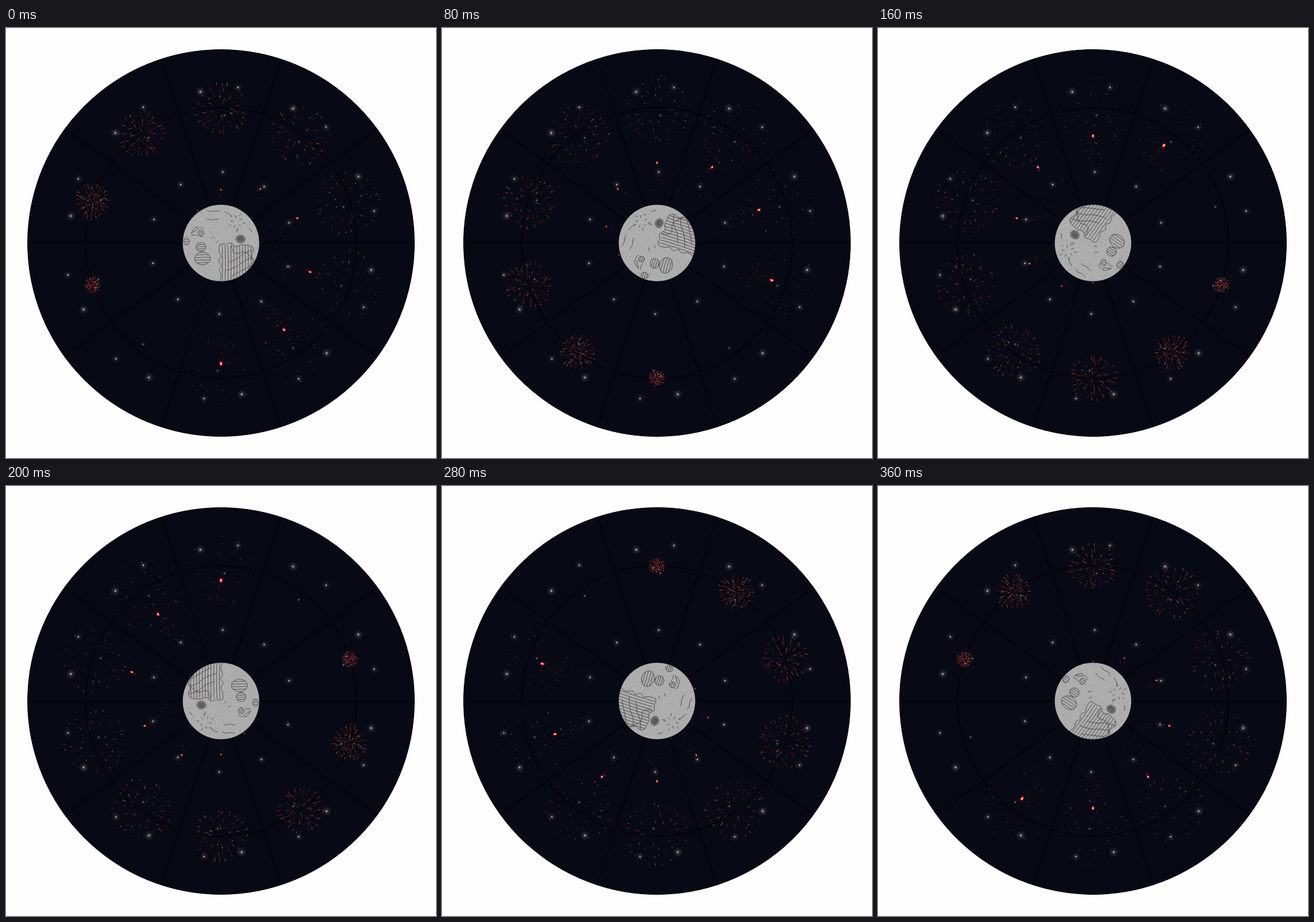
Recreate the animation shown at these times as an HTML page with a canvas. Size 748 by 748 pixels, loop 400 ms.

```html
<!DOCTYPE html>
<html lang="en">
<head>
<meta charset="utf-8">
<title>Fireworks wheel</title>
<style>
  html, body { margin: 0; width: 100%; height: 100%; overflow: hidden; background: #fefefe; }
  canvas { display: block; }
</style>
</head>
<body>
<canvas id="stage" width="748" height="748"></canvas>
<script>
const ctx = document.getElementById('stage').getContext('2d');
const TAU = Math.PI * 2;
const SECTOR = TAU / 10;
const STEP_MS = 40;
const CENTER = 374, DISC_R = 336.4, RING_R = 235.5, MOON_R = 66.5;

function seeded(seed) {
  return () => {
    seed = (seed + 0x6D2B79F5) | 0;
    let t = Math.imul(seed ^ (seed >>> 15), 1 | seed);
    t = (t + Math.imul(t ^ (t >>> 7), 61 | t)) ^ t;
    return ((t ^ (t >>> 14)) >>> 0) / 4294967296;
  };
}

function oval(x, y, rx, ry, tilt = 0) {
  ctx.beginPath();
  ctx.ellipse(x, y, rx, ry, tilt, 0, TAU);
}

function disc(x, y, r, color) {
  oval(x, y, r, r);
  ctx.fillStyle = color;
  ctx.fill();
}

function dot(x, y, size, color) {
  ctx.fillStyle = color;
  ctx.fillRect(x - size / 2, y - size / 2, size, size);
}

// Path smoothed through the midpoints of its points.
function trace(...p) {
  ctx.beginPath();
  ctx.moveTo(p[0], p[1]);
  for (let i = 2; i < p.length - 2; i += 2) {
    ctx.quadraticCurveTo(p[i], p[i + 1], (p[i] + p[i + 2]) / 2, (p[i + 1] + p[i + 3]) / 2);
  }
  ctx.lineTo(p[p.length - 2], p[p.length - 1]);
}

function curve(...points) {
  trace(...points);
  ctx.stroke();
}

function drawPlate() {
  disc(0, 0, DISC_R, '#070914');
  ctx.strokeStyle = '#000';
  ctx.lineWidth = 1;
  ctx.stroke();
  oval(0, 0, RING_R, RING_R);
  ctx.stroke();
  for (let i = 0; i < 10; i++) {
    ctx.beginPath();
    ctx.moveTo(0, 0);
    ctx.lineTo(DISC_R * Math.cos(i * SECTOR), DISC_R * Math.sin(i * SECTOR));
    ctx.stroke();
  }
}

function star(x, y, glow, alpha, core = 1) {
  const g = ctx.createRadialGradient(x, y, 0, x, y, glow);
  g.addColorStop(0, `rgba(190,190,190,${alpha})`);
  g.addColorStop(0.4, `rgba(130,130,130,${alpha * 0.4})`);
  g.addColorStop(1, 'rgba(90,90,90,0)');
  disc(x, y, glow, g);
  disc(x, y, core, '#e8e8e8');
}

function drawStars() {
  star(-36, -263, 9, 0.6);
  star(29.5, -270.5, 8, 0.42);
  star(6, -222, 4.5, 0.3, 0.7);
  star(3, -123.5, 8, 0.42);
}

const BURST_R = [14, 32, 42, 48, 54, 57, 59.5, 61, 61.5];
const STREAK = [5, 12, 11, 8.5, 6.5, 5, 4, 3, 2];
const SPARK_COLORS = ['#8e2020', '#b83a30', '#5c1414', '#d99a84', '#a02828', '#421010'];
const SHELLS = [[25, 0.94], [16, 0.68], [8, 0.43]];

function drawBurst(stage) {
  const place = seeded(41), tint = seeded(900 + stage);
  const y0 = -RING_R + stage * 0.85;
  const fade = 1 - Math.max(0, stage - 5) * 0.1;
  for (const [count, shell] of SHELLS) {
    for (let i = 0; i < count; i++) {
      const a = (i + (place() - 0.5) * 0.8) / count * TAU + shell * 5;
      const reach = BURST_R[stage] * (shell + (place() - 0.5) * 0.14);
      const length = STREAK[stage] * (0.5 + place() * 0.6);
      for (let d = 0; d < length; d += 1.6) {
        const r = reach - d;
        if (r < 1) break;
        const bend = a + (tint() - 0.5) * 1.3 / r;
        ctx.globalAlpha = fade * (tint() < 0.22 ? 0.15 : 0.9);
        dot(r * Math.cos(bend), y0 + r * Math.sin(bend), 1.2,
          SPARK_COLORS[Math.floor(tint() * SPARK_COLORS.length)]);
      }
    }
  }
  if (stage === 0) {
    ctx.globalAlpha = 0.9;
    for (let i = 0; i < 22; i++) {
      const a = tint() * TAU, r = tint() * 9;
      dot(r * Math.cos(a), y0 + r * Math.sin(a), 1.2, i % 3 ? '#c42424' : '#e8a0a0');
    }
  }
  ctx.globalAlpha = 1;
}

function drawRocket(stage) {
  const y = -(22.5 + 23.4 * stage);
  const rand = seeded(70 + stage);
  const sparks = Math.round(stage * stage * 0.85);
  for (let i = 0; i < sparks; i++) {
    const back = rand() ** 0.85 * 11.5 * stage;
    const spread = (3 + back * 0.75) * Math.min(1, (125 - back) / 85);
    ctx.globalAlpha = (0.45 + rand() * 0.5) * (1 - back / 150);
    dot((rand() - 0.5) * spread * 1.5, y + 5 + back, 0.9 + rand() * 0.4,
      SPARK_COLORS[Math.floor(rand() * SPARK_COLORS.length)]);
  }
  ctx.globalAlpha = 1;
  const size = 0.1 + 0.9 * stage / 8;
  oval(0, y, 2.7 * size, 4 * size);
  ctx.fillStyle = '#e01c1c';
  ctx.fill();
  oval(0, y - 0.3, 1.25 * size, 2 * size);
  ctx.fillStyle = '#fff0ea';
  ctx.fill();
}

function drawSectors() {
  for (let stage = 0; stage < 10; stage++) {
    ctx.save();
    ctx.rotate((stage - 3) * SECTOR);
    if (stage < 9) {
      drawBurst(stage);
      drawRocket(stage);
    }
    drawStars();
    ctx.restore();
  }
}

function hatchedOval(x, y, rx, ry, gap, tilt = 0) {
  oval(x, y, rx, ry, tilt);
  ctx.stroke();
  ctx.save();
  ctx.clip();
  for (let h = -ry + gap; h < ry; h += gap) {
    curve(x - rx, y + h + 0.5, x, y + h - 0.6, x + rx, y + h);
  }
  ctx.restore();
}

function drawSea() {
  ctx.save();
  trace(-3, 3, 2, 1, 9, 3, 17, -2, 22, 5, 28, 7, 34, 2, 46, 4, 54, 5, 58, 14, 52, 22,
    59, 31, 50, 39, 46, 70, -5, 70, 2, 57, -5, 44, 3, 40, -6, 31, 2, 24, -4, 16, -3, 3);
  ctx.stroke();
  ctx.clip();
  for (let x = 2; x < 54; x += 5) curve(x, 4, x + 1, 35, x, 70);
  curve(12, 34, 28, 29, 39, 17, 58, 12);
  curve(8, 48, 28, 42, 40, 30, 60, 24);
  curve(18, 58, 34, 49, 46, 43, 58, 33);
  ctx.restore();
  curve(18, 1, 19, 14, 27, 20, 37, 14, 47, 18, 56, 31);
}

function drawMoon() {
  ctx.save();
  disc(0, 0, MOON_R, '#adadad');
  ctx.clip();
  const rand = seeded(12);
  for (let i = 0; i < 5500; i++) {
    const x = (rand() * 2 - 1) * MOON_R, y = (rand() * 2 - 1) * MOON_R;
    dot(x, y, 1.2, rand() < 0.5 ? 'rgba(145,145,145,.25)' : 'rgba(195,195,195,.25)');
  }
  ctx.strokeStyle = '#4c4849';
  ctx.lineWidth = 0.9;
  drawSea();

  curve(-24, -56, -15, -54, -8, -57, -2, -54);
  curve(-25, -42, -16, -39, -9, -42, -4, -41);
  curve(6, -54, 13, -52, 19, -46);
  curve(-17, -8, -12, -12);
  curve(-9, 0, -5, -4);

  // Rays around the small bright crater.
  for (let i = 0; i < 10; i++) {
    const a = i * SECTOR + 0.15, near = i % 2 ? 6 : 11, far = near + 5;
    curve(27 + near * Math.cos(a), -37 + near * Math.sin(a),
      27 + far * Math.cos(a), -37 + far * Math.sin(a));
  }
  curve(49, -26, 54, -19);
  curve(27, -24, 28, -18);

  oval(34, -7, 8, 6.8);
  ctx.fillStyle = '#858283';
  ctx.fill();
  ctx.stroke();
  hatchedOval(34, -7, 5.5, 4.5, 1.8, 0.2);
  oval(34, -7, 3, 2.4);
  ctx.stroke();

  hatchedOval(-60, -3, 5, 6.5, 3.6);
  hatchedOval(-35, 7, 8.5, 8, 3.8);
  hatchedOval(-32, 27, 14, 11, 4.6);
  hatchedOval(-35, -17, 5, 5.5, 3.4, -0.3);
  curve(-52, -17, -47, -25, -42, -29, -39, -25, -45, -21, -52, -17);
  curve(-52, -13, -46, -15, -41, -12);
  curve(-39, -27, -33, -28, -30, -23);
  ctx.restore();
}

function drawWheel(step) {
  ctx.setTransform(1, 0, 0, 1, 0, 0);
  ctx.fillStyle = '#fefefe';
  ctx.fillRect(0, 0, 748, 748);
  ctx.translate(CENTER, CENTER);
  ctx.rotate(-step * SECTOR);
  drawPlate();
  drawSectors();
  drawMoon();
}

let shown = -1;
const start = performance.now();
function tick() {
  const step = Math.floor((performance.now() - start) / STEP_MS) % 10;
  if (step !== shown) drawWheel(shown = step);
  requestAnimationFrame(tick);
}
tick();
</script>
</body>
</html>
```
